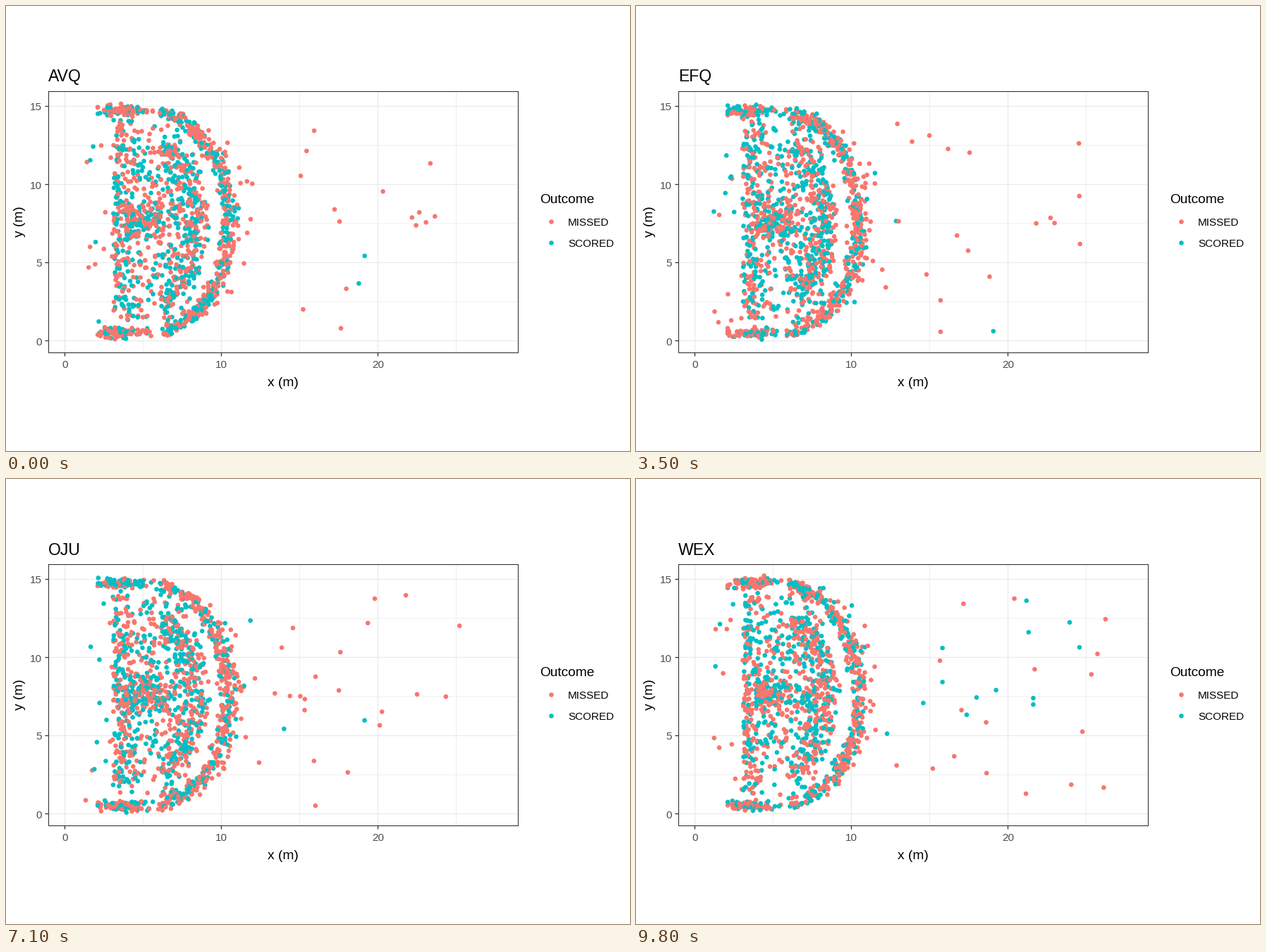
A matplotlib script for the animation above (10000 ms loop, 885 px wide and 632 px high).

```python
import numpy as np
import matplotlib.pyplot as plt
from matplotlib.animation import FuncAnimation

W, H, DPI = 885, 632, 100
UNIT, X0, Y0 = 22.2, 83.5, 475.5            # pixels per metre, pixel origin
LEFT, RIGHT, TOP, BOTTOM = 60.5, 726.5, 121.5, 492.5
MISSED, SCORED = "#F8766D", "#00BFC4"
GRID, DARK, TICK = "#EBEBEB", "#333333", "#4D4D4D"
DOT = 6.6
MID = 7.6                                   # y of the hoop, metres

TEAMS = ("AVQ BIJ BWO CUQ CYJ DEQ DOJ DWU EFQ GIX HUQ IJO JEQ KIJ LUQ "
         "MEJ MOQ MYX NIJ NUX OJU OQE PIJ PUQ QAV REJ SOQ TUJ UVO WEX").split()


def ellipse(rng, n, cx, a, b, reach, spread):
    """Points scattered about the right side of an ellipse."""
    t = np.radians(rng.uniform(-reach, reach, n))
    r = 1 + rng.normal(0, spread, n)
    return cx + a * r * np.cos(t), MID + b * np.sin(t) * np.minimum(r, 1.02)


def zones(rng):
    """Yield (x, y, scoring chance) for each area of the court."""
    # corners
    for y in (14.72, 0.52):
        x = np.clip(rng.normal(3.7, 0.85, 85), 2.1, 6.2)
        yield x, rng.normal(y, 0.17, 85), 0.4
    # three-point arc
    x, y = ellipse(rng, 440, 5.55, 4.85, 7.05, 84, 0.04)
    yield (x + rng.normal(0.05, 0.15, 440),
           y + rng.normal(0, 0.12, 440), 0.37)
    # baseline column
    x = 3.15 + np.abs(rng.normal(0, 0.55, 130)) + rng.normal(0, 0.12, 130)
    yield x, rng.uniform(1.3, 14.2, 130), 0.45
    # open floor inside the arc
    d = 6.4 * (2 * rng.beta(1.5, 1.5, 460) - 1)
    yield (rng.uniform(3.1, 5.2 + 3.9 * np.sqrt(1 - (d / 7) ** 2)),
           MID + d, 0.47)
    # mid-range arc
    x, y = ellipse(rng, 230, 4.9, 3.45, 5.4, 68, 0.13)
    yield x, y, 0.47
    # lane in front of the hoop
    yield (3.9 + np.abs(rng.normal(0, 1.7, 110)),
           rng.normal(MID, 0.5, 110), 0.47)
    # strays outside the arc and behind the column
    d = rng.uniform(-6, 6, 36)
    yield (5.9 + 4.9 * np.sqrt(1 - (d / 7.4) ** 2)
           + rng.exponential(0.35, 36), MID + d, 0.2)
    yield rng.uniform(1.2, 2.9, 12), rng.uniform(0.4, 14.6, 12), 0.4


def shots(rng, x, y, chance):
    return np.column_stack([x, y, rng.random(len(x)) < chance])


def court_shots(team):
    """Rows of x, y, scored; every team has its zones in the same rows."""
    rng = np.random.default_rng(100 + team)
    rows = np.vstack([shots(rng, *zone) for zone in zones(rng)])
    return rows[np.random.default_rng(7).permutation(len(rows))]


def long_shots(team):
    """Heaves from beyond the arc, some of them level with the hoop."""
    rng = np.random.default_rng(500 + team)
    n = 14 + rng.integers(0, 6) + team // 2
    x = rng.uniform(11.8, 25 + 0.06 * team, n)
    y = np.where(rng.random(n) < 0.25, rng.normal(MID, 0.2, n),
                 rng.uniform(0.5, 14.2, n))
    return shots(rng, x, y, 0.08 + 0.008 * team)


COURT = [court_shots(i) for i in range(len(TEAMS))]
LONG = [long_shots(i) for i in range(len(TEAMS))]
SWITCHED = (np.arange(len(COURT[0])) % 2 == 1)[:, None]


def schedule(n):
    """Team shown at tick n, and whether it is giving way to the next."""
    if n < 44:
        return n // 4, n % 4 == 3
    return 11 + (n - 44) // 3, (n - 44) % 3 == 2


def px(x):
    return X0 + UNIT * x


def py(y):
    return Y0 - UNIT * y


plt.rcParams["font.family"] = "Liberation Sans"
fig = plt.figure(figsize=(W / DPI, H / DPI), dpi=DPI, facecolor="white")
ax = fig.add_axes([0, 0, 1, 1])
ax.set(xlim=(0, W), ylim=(H, 0))
ax.axis("off")


def line(xs, ys, color, width, z=1):
    ax.plot(xs, ys, color=color, lw=width * 72 / DPI, zorder=z, snap=False,
            solid_capstyle="butt", solid_joinstyle="miter")


def label(x, y, s, size, color="black", **kw):
    kw.setdefault("va", "baseline")
    return ax.text(x, y, s, fontsize=size * 72 / DPI, color=color, **kw)


def vline(v, color, width):
    line([px(v)] * 2, [TOP, BOTTOM], color, width)


def hline(v, color, width):
    line([LEFT, RIGHT], [py(v)] * 2, color, width)


for v in (5, 15, 25):
    vline(v, GRID, 0.8)
for v in (2.5, 7.5, 12.5):
    hline(v, GRID, 0.8)
for v in (0, 10, 20):
    vline(v, GRID, 1.4)
    line([px(v)] * 2, [BOTTOM, BOTTOM + 5], DARK, 1.3)
    label(px(v), 513.5, str(v), 15.3, TICK, ha="center")
for v in (0, 5, 10, 15):
    hline(v, GRID, 1.4)
    line([LEFT - 5, LEFT], [py(v)] * 2, DARK, 1.3)
    label(51, py(v) + 6, str(v), 15.3, TICK, ha="right")

line([LEFT, RIGHT, RIGHT, LEFT, LEFT], [TOP, TOP, BOTTOM, BOTTOM, TOP],
     DARK, 1.1, 5)
label(393, 539.5, "x (m)", 19.2, ha="center")
label(28.5, 306.5, "y (m)", 19.2, ha="right", va="center", rotation=90)
label(757.5, 280, "Outcome", 19.2)
for y, color, name in ((306, MISSED, "MISSED"), (336.3, SCORED, "SCORED")):
    ax.plot(773.3, y, "o", color=color, ms=DOT * 72 / DPI, mew=0)
    label(797, y + 6, name, 15.3)

title = label(59.8, 107.5, "", 23)
dots = ax.scatter([], [], s=(DOT * 72 / DPI) ** 2, linewidths=0, zorder=3)
COLORS = np.array([MISSED, SCORED])


def draw(n):
    team, leaving = schedule(n)
    rows = COURT[team]
    if leaving:
        rows = np.where(SWITCHED, COURT[team + 1], rows)
    x, y, scored = np.vstack([rows, LONG[team]]).T
    dots.set_offsets(np.column_stack([px(x), py(y)]))
    dots.set_facecolor(COLORS[scored.astype(int)])
    title.set_text(TEAMS[team])
    return dots, title


anim = FuncAnimation(fig, draw, frames=100, interval=100, repeat=True,
                     repeat_delay=0, init_func=lambda: draw(0), blit=False)
plt.show()
```
